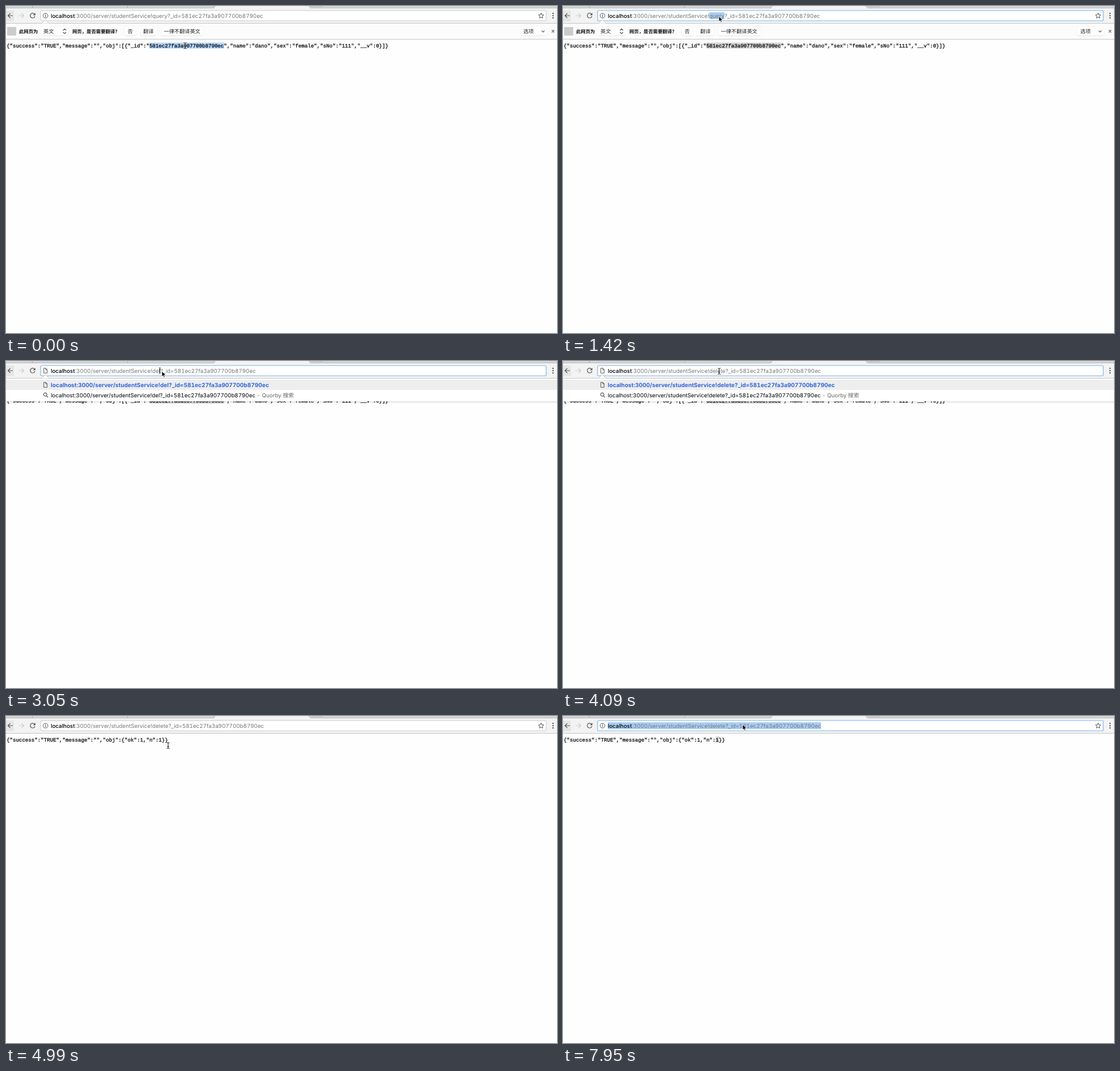
Write an HTML page that moves like this. It is 972 px wide and 576 px high and loops after 8 s.

```html
<!DOCTYPE html>
<html lang="zh-CN">
<head>
<meta charset="utf-8">
<title>Browser session</title>
<style>
  html, body { margin: 0; width: 100%; height: 100%; overflow: hidden; background: #fefefe; }
  svg { display: block; width: 972px; height: 576px; }
  text { white-space: pre; text-rendering: geometricPrecision; font-family: Inter, "Noto Sans CJK SC", "Noto Sans CJK JP", "Noto Sans CJK", sans-serif; }
  .url { font-size: 9.77px; font-feature-settings: "tnum"; }
  .match { font-size: 10.12px; font-weight: 700; fill: #3367d6; }
  .ui { font-size: 9.2px; fill: #222; }
  .label { font-size: 8.4px; font-weight: 700; fill: #111; }
  .json { font: 9.13px "Liberation Mono", monospace; stroke: #000; stroke-width: .25px; }
  .icon { fill: none; stroke: #555; stroke-width: 1.2; }
</style>
</head>
<body>
<svg viewBox="0 0 972 576">
  <defs>
    <path id="file" class="icon" style="stroke-width:1" d="M-2.800-4.300H.8L3-2V4.300H-2.800ZM.6-4.200V-1.800H3"/>
    <linearGradient id="shadow" x2="0" y2="1"><stop stop-color="#000" stop-opacity=".12"/><stop offset="1" stop-color="#000" stop-opacity="0"/></linearGradient>
  </defs>

  <rect id="pageSel"/>
  <text id="json" class="json" x="1"></text>

  <!-- tab strip and toolbar -->
  <rect width="972" height="4" fill="#d5d6d7"/>
  <path d="M0 3.500H367M537 3.500H972" stroke="#b9b9b9"/>
  <path d="M46.500 0V3M214.500 0V3" stroke="#b0b0b0"/>
  <path d="M366 4L369 0H534L538 4Z" fill="#f3f3f3"/>
  <path d="M366 4L369 0M534 0L538 4" stroke="#aaa"/>
  <path d="M538 0H557L558 1H540Z" fill="#eee" stroke="#aaa" stroke-width=".6"/>
  <rect y="4" width="972" height="26" fill="#f3f3f3"/>
  <rect y="8" width="14" height="19" fill="#e6e6e6"/>
  <path d="M0 30.500H972" stroke="#c4c4c4"/>
  <path class="icon" d="M12 17H3.500M7.500 13L3.500 17L7.500 21"/>
  <path class="icon" style="stroke:#ccc" d="M22.500 17H31.500M27.500 13L31.500 17L27.500 21"/>
  <path class="icon" d="M50.500 14.500A4.200 4.200 0 1 0 51 18"/>
  <path d="M51.800 12V16.200H47.600Z" fill="#555"/>
  <g fill="#555"><circle cx="965" cy="13" r="1.200"/><circle cx="965" cy="17" r="1.200"/><circle cx="965" cy="21" r="1.200"/></g>

  <!-- address field -->
  <rect id="field" x="61" y="8" width="892" height="18" rx="2" fill="#fff"/>
  <rect id="urlSel" y="11" height="12" fill="#a9cef6"/>
  <g id="info" class="icon"><circle cx="69.700" cy="17" r="4.200" stroke-width="1"/><path d="M69.700 16.300V19.500M69.700 14.300V15.400"/></g>
  <use id="fieldFile" href="#file" x="69.500" y="17"/>
  <path id="star" class="icon" stroke-linejoin="round" style="stroke-width:1" d="M944 12.300L945.300 15.500L948.700 15.800L946.100 18L946.900 21.400L944 19.600L941.100 21.400L941.900 18L939.300 15.800L942.700 15.500Z"/>
  <text id="url" class="url" x="79" y="20.600" fill="#777"><tspan fill="#000" font-weight="500">localhost</tspan><tspan id="path"></tspan></text>
  <path id="caret" stroke="#000"/>

  <!-- translation bar -->
  <g id="bar">
    <rect y="31" width="972" height="27" fill="#fcfcfc"/>
    <path d="M0 58.500H972" stroke="#c4c4c4"/>
    <rect x="2" y="37" width="16" height="15" fill="#ccc"/>
    <g fill="#fff" stroke="#f1f1f1" stroke-width=".7">
      <rect x="61" y="36" width="49" height="16.500" rx="2"/><rect x="209" y="36" width="20" height="16.500" rx="2"/>
      <rect x="236" y="36" width="30" height="16.500" rx="2"/><rect x="273" y="36" width="75" height="16.500" rx="2"/>
      <rect x="907" y="36" width="48" height="16.500" rx="2"/>
    </g>
    <path d="M62 52.500H109M210 52.500H228M237 52.500H265M274 52.500H347M908 52.500H954" stroke="#e2e2e2" stroke-width=".8"/>
    <text class="label" x="23" y="47.600">此网页为</text>
    <text class="ui" x="66" y="47.800">英文</text>
    <text class="label" x="117" y="47.600">网页，是否需要翻译？</text>
    <text class="ui" x="214.500" y="47.800">否</text>
    <text class="ui" x="242" y="47.800">翻译</text>
    <text class="ui" x="278.500" y="47.800">一律不翻译英文</text>
    <text class="ui" x="912.500" y="47.800">选项</text>
    <path class="icon" d="M100.500 43L103.300 40.300L106.100 43M100.500 46L103.300 48.700L106.100 46M945 43.300L947.500 45.800L950 43.300M962.800 42.200L967.200 46.600M967.200 42.200L962.800 46.600"/>
  </g>

  <!-- suggestions -->
  <g id="menu">
    <rect y="71" width="972" height="4" fill="url(#shadow)"/>
    <rect y="31" width="972" height="40" fill="#fff"/>
    <rect y="33" width="972" height="18" fill="#eee"/>
    <use href="#file" x="69.500" y="42"/>
    <path class="icon" d="M71.500 61.500L74 64M72.200 59A2.900 2.900 0 1 1 66.400 59A2.900 2.900 0 1 1 72.200 59"/>
    <text id="match" class="match" x="79" y="45.700" style="font-feature-settings:'tnum'"></text>
    <text class="url" x="79" y="63.500" fill="#000"><tspan id="search"></tspan><tspan fill="#666"> - Quorby 搜索</tspan></text>
  </g>
  <path id="notch" d="M62.500 30.500L69.500 24L76.500 30.500" fill="#fcfcfc" stroke="#c4c4c4"/>

  <path id="arrow" d="M0 0V9.500L2.200 7.600L3.700 11L5.300 10.300L3.800 7H6.800Z" stroke="#fff" stroke-width=".8"/>
  <g id="beam" fill="none">
    <path id="beamHalo" stroke="#fff" stroke-width="2.200" stroke-opacity=".7"/>
    <path id="beamLine" stroke="#111" stroke-width="1"/>
  </g>
</svg>
<script>
  const $ = id => document.getElementById(id);
  const set = (id, attrs) => Object.entries(attrs).forEach(([k, v]) => $(id).setAttribute(k, v));
  const show = (id, on) => set(id, { visibility: on ? "visible" : "hidden" });

  const LOOP = 8000, PITCH = 5.48, VERB = 37;
  const RECORD = "581ec27fa3a907700b8790ec";
  const PAGES = {
    list: `{"success":"TRUE","message":"","obj":[{"_id":"${RECORD}","name":"dano","sex":"female","sNo":"111","__v":0}]}`,
    result: '{"success":"TRUE","message":"","obj":{"ok":1,"n":1}}'
  };
  const beam = (x, y) => ({ mouse: ["beam", x, y] });
  const arrow = (x, y) => ({ mouse: ["arrow", x, y] });
  const typed = verb => ({ verb, menu: true, urlSel: null, caret: true });

  // Each step changes only the listed parts of the state.
  const steps = [
    [0, { page: "list", verb: "query", focus: false, menu: false, caret: false, urlSel: null, pageSel: [46, 70], ...beam(316, 70) }],
    [140, beam(314, 66)], [290, beam(304, 52)], [440, beam(291, 36)],
    [590, arrow(281, 24)], [740, arrow(277, 17)], [980, arrow(275, 18)],
    [1270, { focus: true, urlSel: [0, 71] }],
    [1420, { urlSel: [VERB, VERB + 5] }],
    [2020, typed("d")], [2170, typed("de")], [2610, { caret: false }],
    [3050, typed("del")], [3200, typed("dele")], [3350, typed("delet")], [3500, typed("delete")],
    [3940, { caret: false }], [4090, beam(275.5, 18)],
    [4240, { page: "result", focus: false, menu: false, pageSel: null }],
    [4990, beam(286, 52)], [5140, beam(299, 88)], [5290, beam(299, 91)],
    [5440, beam(283, 66)], [5590, beam(257, 46)], [5720, beam(242, 41.5)],
    [6320, { pageSel: [44, 45] }], [6470, beam(250, 41)], [6620, beam(263, 41)], [6760, beam(271, 41)],
    [7060, { pageSel: [49, 50] }], [7210, beam(274, 39)], [7360, beam(284, 33)],
    [7510, arrow(297, 26)], [7660, arrow(309, 20)], [7810, arrow(317, 15)],
    [7950, { focus: true, urlSel: [0, 72] }]
  ];

  const urlX = i => i ? $("url").getEndPositionOfChar(i - 1).x : 79;

  function render(s) {
    const path = `:3000/server/studentService!${s.verb}?_id=${RECORD}`;
    const full = "localhost" + path;
    $("path").textContent = path;
    $("match").textContent = $("search").textContent = full;
    $("json").textContent = PAGES[s.page];

    const list = s.page === "list", baseline = list ? 73 : 44.7;
    set("json", { y: baseline });
    show("bar", list && !s.menu);
    show("notch", list);
    show("menu", s.menu);
    show("star", !s.menu);
    show("info", !s.menu);
    show("fieldFile", s.menu);
    set("field", { stroke: s.focus ? "#7db4ea" : "#cacaca", "stroke-width": s.focus ? 1.2 : 1 });

    show("pageSel", s.pageSel);
    if (s.pageSel) {
      const [from, to] = s.pageSel;
      set("pageSel", { x: 1 + from * PITCH, width: (to - from) * PITCH, y: baseline - 8.5, height: 10.5, fill: s.focus ? "#d3d3d3" : "#b3d6fd" });
    }
    show("urlSel", s.urlSel);
    if (s.urlSel) {
      const [from, to] = s.urlSel.map(i => urlX(Math.min(i, full.length)));
      set("urlSel", { x: from, width: to - from });
    }
    show("caret", s.caret);
    if (s.caret) set("caret", { d: `M${Math.floor(urlX(VERB + s.verb.length)) + .5} 11V23` });

    const [kind, x, y] = s.mouse;
    for (const id of ["arrow", "beam"]) show(id, id === kind);
    set(kind, { transform: `translate(${x} ${y})` });
  }

  const beamShape = "M-2.5-5.3Q0-5.3 0-3.8V3.800Q0 5.300-2.500 5.300M2.500-5.300Q0-5.300 0-3.800M0 3.800Q0 5.300 2.500 5.300M-1.500 1.800H1.500";
  set("beamHalo", { d: beamShape });
  set("beamLine", { d: beamShape });

  let shown = -1;
  function tick() {
    const t = performance.now() % LOOP;
    const count = steps.filter(([at]) => at <= t).length;
    if (count !== shown) {
      render(Object.assign({}, ...steps.slice(0, count).map(([, change]) => change)));
      shown = count;
    }
    requestAnimationFrame(tick);
  }
  tick();
</script>
</body>
</html>
```
